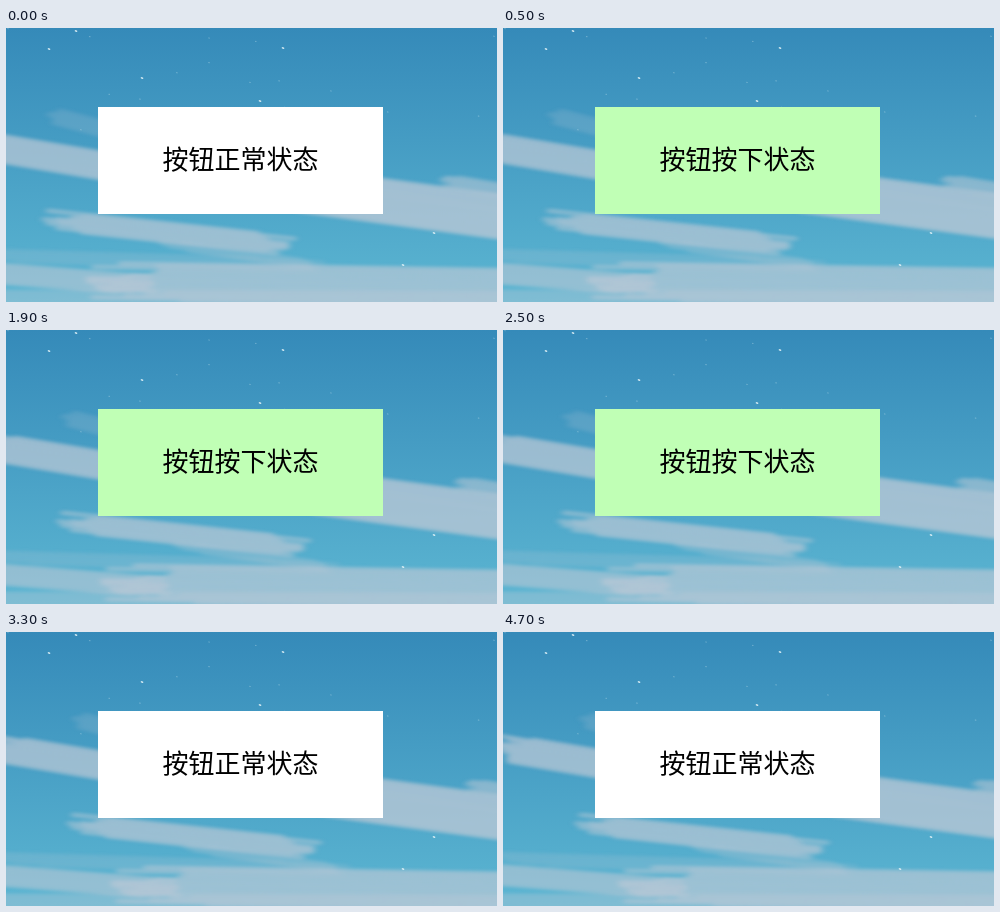
Animation of 491 by 274 pixels, one loop 4800 ms. Source, as an HTML page:

```html
<!DOCTYPE html>
<html lang="zh-CN">
<head>
<meta charset="utf-8">
<style>
html, body { margin: 0; width: 100%; height: 100%; overflow: hidden; background: #459fc8; }
#stage { position: relative; width: 491px; height: 274px; overflow: hidden; }
svg { position: absolute; left: 0; top: 0; }
#button {
  position: absolute; left: 92px; top: 79px; width: 285px; height: 107px;
  background: #fff; color: #000; text-align: center;
  font: 26px/102px "Noto Sans CJK SC", "Noto Sans CJK", sans-serif;
  white-space: nowrap;
}
#button.pressed { background: #c0ffb5; }
</style>
</head>
<body>
<div id="stage">
  <svg width="491" height="274" viewBox="0 0 491 274">
    <defs>
      <linearGradient id="sky" x1="0" y1="0" x2="0" y2="1">
        <stop offset="0" stop-color="#358ab9"/>
        <stop offset="1" stop-color="#5cb6d2"/>
      </linearGradient>
      <filter id="soft"><feGaussianBlur stdDeviation="3 1.8"/></filter>
    </defs>
    <rect width="491" height="274" fill="url(#sky)"/>
    <g id="clouds" filter="url(#soft)" stroke="#bcc9d5" stroke-linecap="round"></g>
    <g id="stars" fill="#e6f4f8"></g>
  </svg>
  <div id="button">按钮正常状态</div>
</div>
<script>
const LOOP = 4800, STEP = 100, DRIFT = 0.0076;
const PRESS = 500, RELEASE = 2600;

const byId = id => document.getElementById(id);

let seed = 7;
function random() {
  seed = (seed * 16807) % 2147483647;
  return seed / 2147483647;
}

// A cloud is a bundle of strands; the outer ones are shorter, so its ends taper.
function cloud(x1, y1, x2, y2, width, opacity) {
  const count = Math.max(4, Math.round(width / 2));
  let strands = '';
  for (let i = 0; i < count; i++) {
    const side = 2 * i / (count - 1) - 1;
    const trim = () => random() * (0.05 + 0.17 * Math.abs(side));
    const a = trim(), b = 1 - trim();
    const x = u => x1 + (x2 - x1) * u;
    const y = u => y1 + (y2 - y1) * u + side * (width / 2 - 2);
    strands += `<line x1="${x(a)}" y1="${y(a)}" x2="${x(b)}" y2="${y(b)}" stroke-width="5" stroke-opacity=".6"/>`;
  }
  return `<g opacity="${opacity}">${strands}</g>`;
}

function star(x, y, size, opacity) {
  return `<ellipse cx="${x}" cy="${y}" rx="${size}" ry="${size * 0.65}" opacity="${opacity}" transform="rotate(20 ${x} ${y})"/>`;
}

byId('clouds').innerHTML = [
  cloud(-60, 226, 330, 238, 14, 0.22),
  cloud(-150, 270, 640, 272, 18, 0.4),
  cloud(-45, 114, 170, 150, 30, 0.8),
  cloud(40, 86, 140, 112, 18, 0.22),
  cloud(280, 160, 600, 203, 46, 0.85),
  cloud(436, 152, 570, 174, 14, 0.6),
  cloud(35, 191, 290, 218, 22, 0.75),
  cloud(150, 215, 310, 237, 10, 0.35),
  cloud(-90, 239, 150, 258, 22, 0.65),
  cloud(80, 253, 620, 262, 40, 0.75)
].join('');

const bright = [[43, 21], [136, 50], [254, 73], [277, 20], [428, 205], [70, 3], [397, 237]];
const faint = Array.from({ length: 18 }, () => [random() * 491, random() * 110]);
byId('stars').innerHTML =
  bright.map(([x, y]) => star(x, y, 1.4, 0.85)).join('') +
  faint.map(([x, y]) => star(x, y, 0.9, 0.3)).join('');

const clouds = byId('clouds'), button = byId('button');
const start = performance.now();

function draw(now) {
  const time = Math.floor((Math.max(0, now - start) % LOOP) / STEP) * STEP;
  const pressed = time >= PRESS && time < RELEASE;
  clouds.setAttribute('transform', `translate(${time * DRIFT} 0)`);
  button.className = pressed ? 'pressed' : '';
  button.textContent = pressed ? '按钮按下状态' : '按钮正常状态';
  requestAnimationFrame(draw);
}
draw(start);
</script>
</body>
</html>
```
